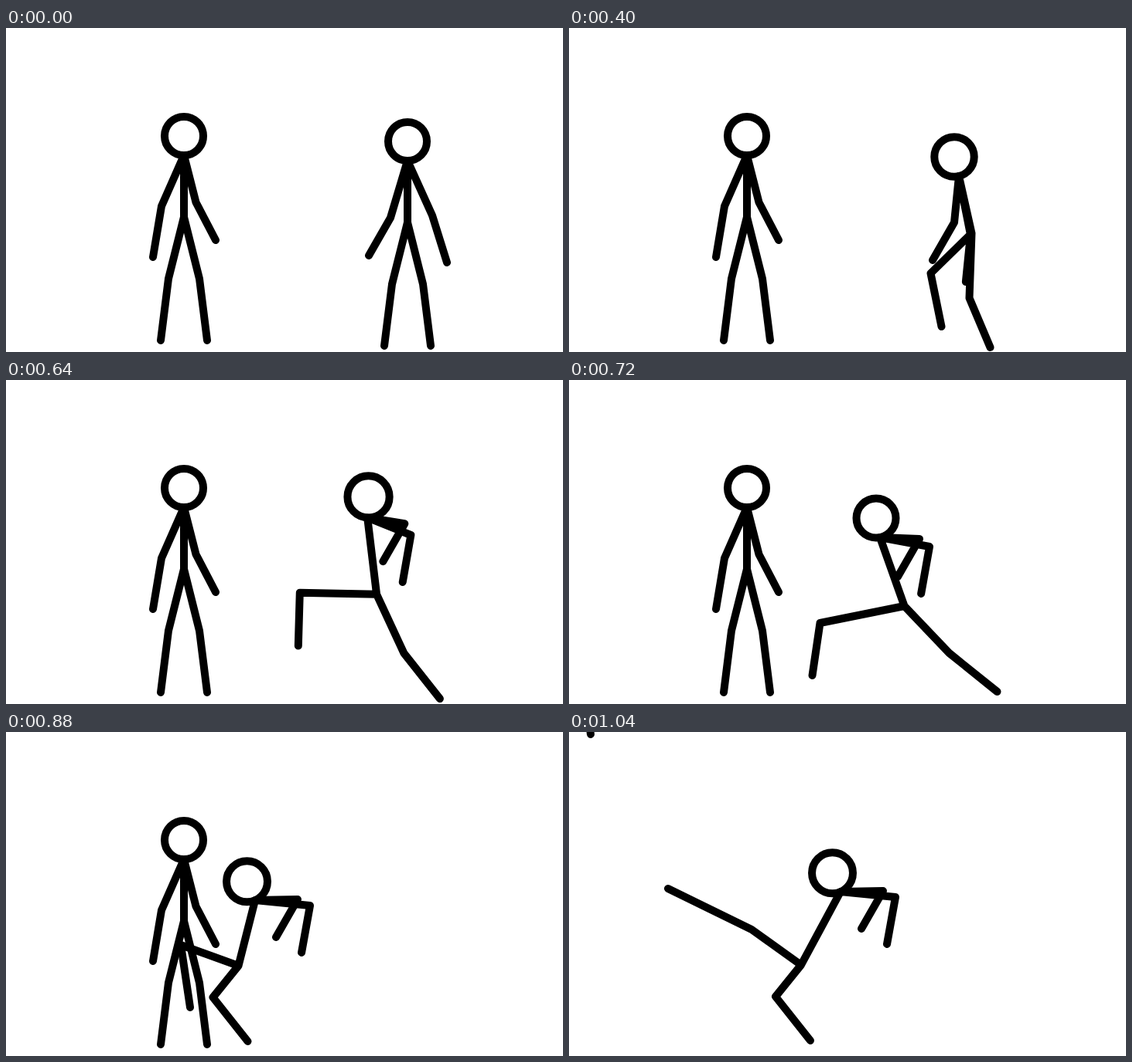
An HTML page for the animation above (1.2 s loop, 720 by 420 pixels).

```html
<!DOCTYPE html>
<html lang="en">
<head>
<meta charset="utf-8">
<title>Stick figure kick</title>
<style>
  html, body { margin: 0; width: 100%; height: 100%; overflow: hidden; background: #fff; }
  svg { display: block; width: 720px; height: 420px; }
  g { fill: none; stroke: #000; stroke-width: 10; stroke-linecap: round; stroke-linejoin: round; }
</style>
</head>
<body>
<svg viewBox="0 0 720 420">
  <g id="victim"><path/><circle/></g>
  <g id="kicker"><path/><circle/></g>
</svg>
<script>
const LOOP = 1200, STEP = 40, START = 240, LAST = 20;

// Each bone hangs on the end of its parent; a pose gives every bone as a vector.
const PARENT = {
  torso: "hip", head: "torso",
  armA: "torso", foreA: "armA", armB: "torso", foreB: "armB",
  thighA: "hip", shinA: "thighA", thighB: "hip", shinB: "thighB",
};
const BONES = Object.keys(PARENT);

const upright = {
  torso: [0, -80], head: [0, -25],
  thighA: [-20, 80], shinA: [-10, 80], thighB: [20, 80], shinB: [10, 80],
};
const standing = { ...upright, hip: [230, 245],
  armA: [-29, 66], foreA: [-11, 66], armB: [15.5, 61], foreB: [25.5, 49] };

const ready = { ...upright, hip: [519, 252], armA: [-22, 74], armB: [32, 71] };
const dip = { ...ready, hip: [518, 259], torso: [-9, -76], head: [-3, -25], armB: [25, 76],
  thighA: [-27, 78], shinA: [-2, 76], thighB: [13, 79], shinB: [17, 75] };
const crouch = { hip: [520.5, 266], torso: [-16.5, -74], head: [-6, -25],
  armA: [-6, 60], armB: [15, 76],
  thighA: [-53, 52], shinA: [14, 69], thighB: [-3, 84], shinB: [27, 64] };
const rear = { hip: [512, 261.7], torso: [18, -105], head: [8.4, -28.4],
  armA: [45, 14], armB: [47, 33],
  thighA: [-83, -16], shinA: [9, 69], thighB: [0, 84], shinB: [25, 67] };
const lunge = { hip: [433.5, 293], torso: [-31.5, -89], head: [-5, -25],
  armA: [51, 2], armB: [64, 12],
  thighA: [-109, 22], shinA: [-10, 68], thighB: [58, 61], shinB: [62, 50] };
const plant = { hip: [300.5, 303], torso: [21.5, -85], head: [-10.5, -24.3],
  armA: [55, -1], armB: [71, 7],
  thighA: [-33, 41], shinA: [45, 57], thighB: [-74.5, -27], shinB: [12, 81] };
const kick = { ...plant, hip: [300, 302], torso: [51, -95],
  thighB: [-64, -46], shinB: [-108, -53] };

// Top of the wind-up: a little further back than rear, away from the lunge.
const peak = {};
for (const name in rear) peak[name] = rear[name].map((v, i) => v + 0.11 * (v - lunge[name][i]));

const TIMELINE = new Map([[0, ready], [1, dip], [4, crouch], [7, peak], [8, rear],
  [12, lunge], [16, plant], [LAST, kick]]);
const keys = [...TIMELINE.keys()];

// Forearms hang: A always the same way, B swings in as the crouch begins.
const poses = [...TIMELINE].map(([k, pose]) =>
  ({ ...pose, foreA: [-28, 49], foreB: [30 * Math.exp(-k / 2.2) - 11, 61] }));

// Smooth curve through the keys that never overshoots them.
function curve(vals) {
  const slope = i => (vals[i + 1] - vals[i]) / (keys[i + 1] - keys[i]);
  const tangent = i => {
    if (i === 0 || i === keys.length - 1) return 0;
    const a = slope(i - 1), b = slope(i);
    return a * b > 0 ? 2 * a * b / (a + b) : 0;
  };
  return k => {
    let i = 0;
    while (i < keys.length - 2 && k >= keys[i + 1]) i++;
    const h = keys[i + 1] - keys[i], u = (k - keys[i]) / h, w = 1 - u;
    return w * w * (1 + 2 * u) * vals[i] + u * u * (3 - 2 * u) * vals[i + 1]
      + h * u * w * (w * tangent(i) - u * tangent(i + 1));
  };
}

// Bones turn and stretch rather than slide, so limbs swing in arcs.
function swing(vectors) {
  const turn = 2 * Math.PI;
  const angles = vectors.map(([x, y]) => Math.atan2(y, x));
  for (let i = 1; i < angles.length; i++) {
    angles[i] -= turn * Math.round((angles[i] - angles[i - 1]) / turn);
  }
  const angle = curve(angles), length = curve(vectors.map(v => Math.hypot(...v)));
  return k => [length(k) * Math.cos(angle(k)), length(k) * Math.sin(angle(k))];
}

const hipX = curve(poses.map(p => p.hip[0])), hipY = curve(poses.map(p => p.hip[1]));
const motion = { hip: k => [hipX(k), hipY(k)] };
for (const name of BONES) motion[name] = swing(poses.map(p => p[name]));

function draw(id, pose) {
  const end = { hip: pose.hip };
  for (const name of BONES) end[name] = pose[name].map((v, i) => v + end[PARENT[name]][i]);
  const limb = (...names) => "M" + names.map(n => end[n].map(v => v.toFixed(2)).join(" ")).join("L");
  const [path, ring] = document.getElementById(id).children;
  path.setAttribute("d", limb("hip", "torso")
    + limb("torso", "armA", "foreA") + limb("torso", "armB", "foreB")
    + limb("hip", "thighA", "shinA") + limb("hip", "thighB", "shinB"));
  ring.setAttribute("cx", end.head[0]);
  ring.setAttribute("cy", end.head[1]);
  ring.setAttribute("r", Math.hypot(...pose.head));
}

draw("victim", standing);
const victim = document.getElementById("victim");

function render(ms) {
  const k = Math.min(LAST, Math.max(0, Math.floor((ms % LOOP - START) / STEP)));
  const pose = {};
  for (const name in motion) pose[name] = motion[name](k);
  draw("kicker", pose);
  const fly = Math.max(0, k - 17) / 3;
  victim.setAttribute("transform", `translate(${-232 * fly} ${-402 * fly})`);
}

const begin = performance.now();
function tick() {
  render(performance.now() - begin);
  requestAnimationFrame(tick);
}
tick();
</script>
</body>
</html>
```
